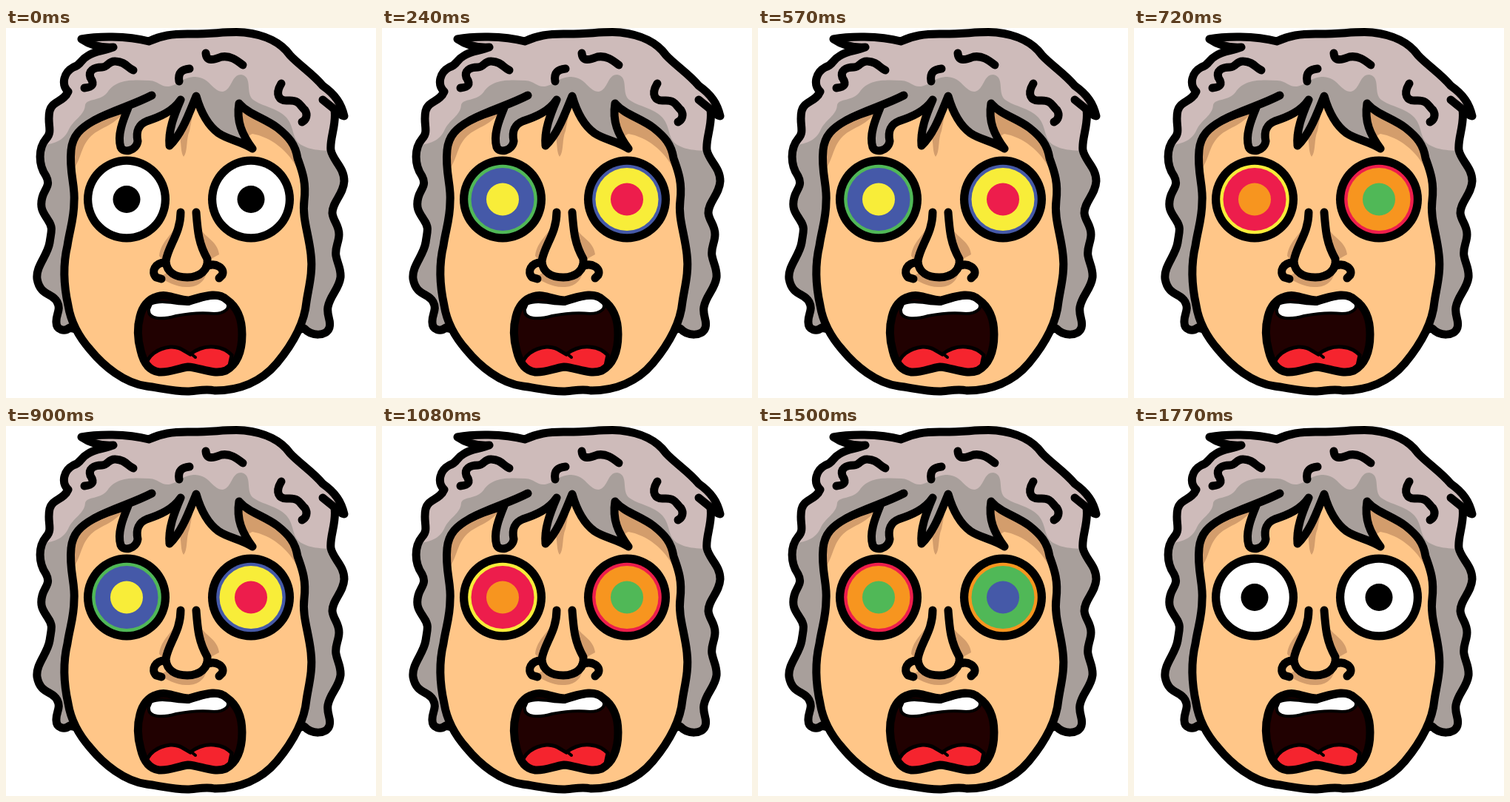
Recreate the animation shown at these times as an HTML page. Size 500 by 500 pixels, loop 1800 ms.

```html
<!DOCTYPE html>
<html lang="en">
<head>
<meta charset="utf-8">
<title>Dizzy eyes</title>
<style>
html, body { margin: 0; width: 100%; height: 100%; overflow: hidden; background: #fff; }
svg { display: block; width: 100vw; height: 100vh; }
.line { fill: none; stroke: #000; stroke-width: 11; stroke-linecap: round; stroke-linejoin: round; }
</style>
</head>
<body>
<svg viewBox="0 0 500 500">
  <defs>
    <path id="hair" d="M102 15 C122 11 163 10 193 18 C210 10 225 8 245 8 C275 9 300 4 322 6
      C350 9 372 20 384 37 C396 50 415 62 428 78 C445 90 453 102 457 119 L444 111 C447 130 437 150 439 165
      C442 180 457 188 457 207 C456 225 441 235 441 250 C442 261 450 266 450 279
      C450 290 444 297 446 308 C448 319 453 325 452 337 C450 353 438 361 435 377
      C433 390 440 395 437 405 C433 417 413 417 403 406 L250 440 L86 405
      C79 411 68 408 68 398 C67 387 75 381 69 370 C63 358 46 362 42 339
      C40 322 56 308 59 290 C61 275 64 270 57 260 C51 250 45 244 49 229
      C52 217 61 213 54 200 C43 184 44 162 54 150 C64 140 55 130 59 112
      C63 98 78 100 84 86 C74 76 78 60 91 53 C103 49 99 44 110 38
      C119 31 133 31 145 26 C128 27 115 24 102 15Z"/>
    <path id="face" d="M92 235 C94 213 85 195 88 165 C90 145 101 135 119 125 C134 117 151 112 165 108
      C158 125 150 145 155 161 C159 170 176 166 178 153 C175 139 180 130 190 126
      C208 120 225 113 236 97 C227 118 219 139 221 159 C237 144 246 119 257 92
      C263 113 272 131 287 142 C300 151 318 153 333 163 C319 144 311 126 315 102
      C328 117 350 122 367 135 C382 147 391 157 394 176 C400 193 406 208 403 233
      C400 257 409 278 412 306 C415 330 409 350 406 370 C403 402 386 429 366 453
      C345 478 315 490 282 490 C269 487 256 491 245 491 C225 491 207 486 190 484
      C160 480 132 457 114 435 C99 418 88 400 84 375 C78 348 77 319 83 294
      C86 273 92 258 92 235Z"/>
    <path id="mouth" d="M204 363 C219 358 232 368 247 368 C264 364 285 355 298 367 C314 378 319 394 319 414
      C319 436 313 454 297 463 C280 469 263 459 246 458 C231 460 222 466 207 465
      C191 463 185 449 182 436 C177 418 178 401 181 390 C184 377 192 366 204 363Z"/>
    <clipPath id="inHair"><use href="#hair"/></clipPath>
    <clipPath id="inFace"><use href="#face"/></clipPath>
    <clipPath id="inMouth"><use href="#mouth"/></clipPath>
  </defs>

  <use href="#hair" fill="#a89f9b"/>
  <path clip-path="url(#inHair)" fill="#cebbba" d="M30 158 C62 161 78 152 84 139 C91 123 106 119 107 104 C109 95 128 99 137 87
    C149 69 170 70 194 71 C207 72 209 80 220 79 C233 77 239 66 256 66 C276 67 279 86 293 86
    C306 83 304 63 318 63 C334 66 323 88 334 97 C346 106 367 108 379 121
    C391 135 385 151 401 159 C414 166 430 166 470 167 V0 H30Z"/>
  <use href="#hair" class="line"/>

  <use href="#face" fill="#ffc688"/>
  <g fill="#d39d6c" clip-path="url(#inFace)">
    <path d="M88 194 C101 183 100 160 115 146 C129 133 149 132 163 108 L80 120Z"/>
    <path d="M222 159 L235 147 C237 157 236 169 240 174 C246 167 243 150 248 139 L257 92 L230 95Z"/>
    <path d="M310 100 L334 164 C326 153 326 145 333 143 C356 147 382 164 396 195 L404 120Z"/>
    <path d="M233 261 C227 278 209 288 207 308 L216 319 L234 281Z M261 268 C267 283 286 287 288 306 L270 316Z"/>
    <path d="M205 336 C216 335 218 326 226 333 C240 340 257 338 271 330 C268 346 255 350 246 350 C231 351 218 343 205 336Z"/>
  </g>
  <g class="line">
    <use href="#face"/>
    <path d="M119 125 C145 111 172 104 197 91"/>
    <path d="M106 81 C117 80 120 76 114 67 C111 58 118 53 130 53 C138 53 138 44 148 45 C162 46 163 53 172 57"/>
    <path d="M234 72 C232 60 238 56 248 55"/>
    <path d="M270 34 C271 46 281 43 291 39 C303 37 311 43 320 50"/>
    <path d="M372 75 C363 90 369 99 381 98 C397 97 397 105 404 111 C408 117 406 124 400 127"/>
    <path d="M428 97 L454 118"/>
    <path d="M236 249 C236 278 219 294 216 315 C217 331 230 337 245 337 C262 337 274 327 272 312 C260 291 259 274 257 249"/>
    <path d="M215 317 C202 317 195 329 203 337 L210 339 M271 322 C283 316 297 325 292 334 L288 338"/>
  </g>

  <use href="#mouth" fill="#210101"/>
  <g clip-path="url(#inMouth)">
    <path fill="#f5242e" stroke="#000" stroke-width="5" d="M188 459 C191 442 205 433 222 431 C234 430 241 437 249 441
      C258 434 270 430 281 431 C294 432 300 437 305 442 L298 475 H190Z"/>
    <path class="line" style="stroke-width:4" d="M248 440 Q252 441 256 445"/>
    <path fill="#fff" stroke="#000" stroke-width="4" d="M196 373 C211 366 231 374 247 373 C263 368 286 359 297 369
      C306 379 294 386 281 386 C263 384 245 386 230 389 C213 394 191 395 193 380Z"/>
  </g>
  <use href="#mouth" class="line"/>

  <g id="eyes"></g>
</svg>
<script>
const LOOP = 1800, STEPS = 25;
const COLORS = ["#f8ed39", "#ed1d4c", "#f7951f", "#50b857", "#4559a8"];
const eyes = document.getElementById("eyes");

function circle(x, r, fill) {
  const el = document.createElementNS("http://www.w3.org/2000/svg", "circle");
  const attrs = { cx: x, cy: 231.5, r, fill };
  for (const key in attrs) el.setAttribute(key, attrs[key]);
  return eyes.appendChild(el);
}

const rings = [163, 331].map(x => {
  circle(x, 58, "#000");
  return [46.8, 42.5, 22].map(r => circle(x, r, "#fff"));
});

// Colours step outward through the rings; the right eye runs one step ahead.
function draw(time) {
  const step = Math.round(time % LOOP / LOOP * STEPS) % STEPS;
  rings.forEach((eye, side) => eye.forEach((ring, i) => {
    const plain = i === 2 ? "#000" : "#fff";
    ring.setAttribute("fill", step ? COLORS[(step + side + i) % COLORS.length] : plain);
    if (i === 2) ring.setAttribute("r", step ? 22 : 18.5);
  }));
}

const start = performance.now();
function tick() {
  draw(performance.now() - start);
  requestAnimationFrame(tick);
}
draw(0);
requestAnimationFrame(tick);
</script>
</body>
</html>
```
